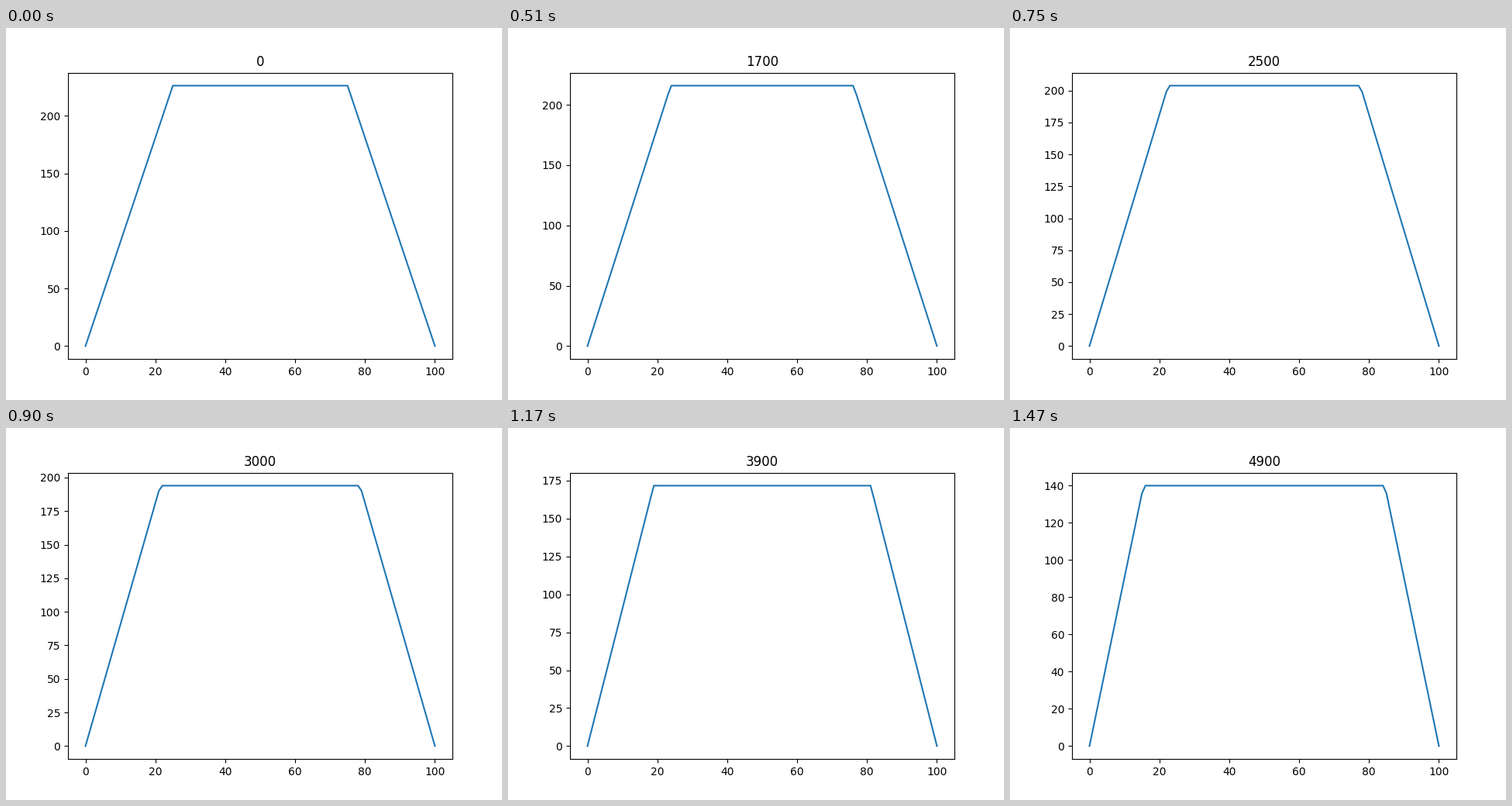
Write a matplotlib script that moves like this. It is 640x480 px and loops after 1.5 s.

```python
import numpy as np
import matplotlib.pyplot as plt
from matplotlib.animation import FuncAnimation

FRAMES = 50
STEP = 100                      # simulation steps per frame
PEAK = 160 * np.sqrt(2)         # initial height of the plateau
SLOPE = PEAK / 25               # steepness of both flanks
FALL = 3.593e-6                 # plateau drop per squared step

fig, ax = plt.subplots(figsize=(6.4, 4.8), dpi=100)
x = np.arange(101)


def profile(step):
    """Ramp up, flat plateau, ramp down; the plateau falls quadratically."""
    plateau = PEAK - FALL * step ** 2
    return np.minimum(SLOPE * np.minimum(x, 100 - x), plateau)


def draw(frame):
    step = frame * STEP
    ax.clear()
    ax.plot(x, profile(step))
    ax.set_title(str(step))


anim = FuncAnimation(fig, draw, frames=FRAMES, interval=30,
                     init_func=lambda: draw(0), repeat=True, repeat_delay=0)
plt.show()
```
